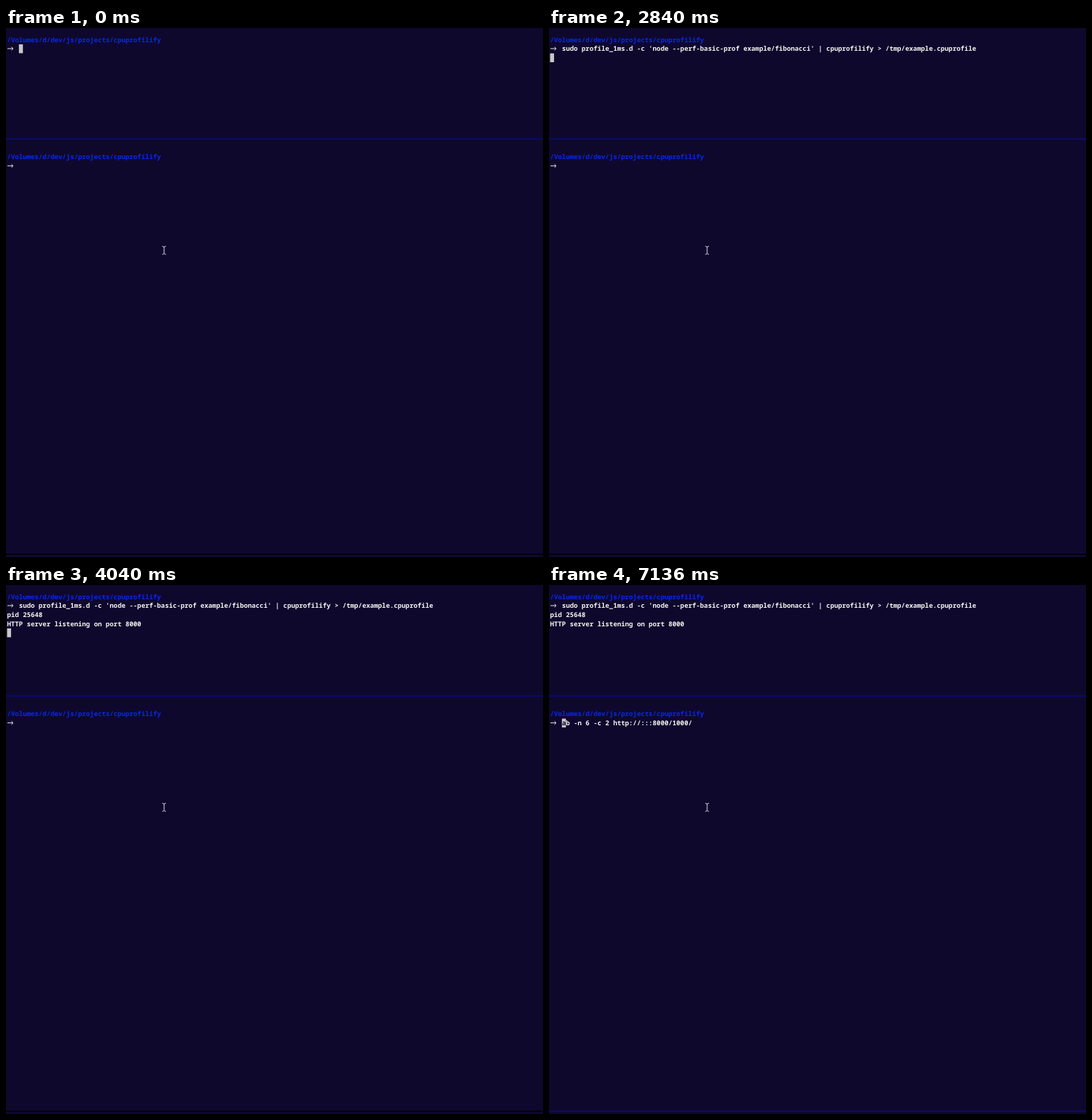
An HTML page for the animation above (8000 ms loop, 754 by 743 pixels).

```html
<!DOCTYPE html>
<html lang="en">
<head>
<meta charset="utf-8">
<title>Terminal profiling session</title>
<style>
html, body { margin: 0; width: 100%; height: 100%; overflow: hidden; background: #0f082d; }
svg { display: block; width: 100%; height: 100%; }
text { font: 600 9.24px "Noto Sans Mono", "DejaVu Sans Mono", monospace; fill: #f4f4f0; text-rendering: geometricPrecision; }
.path { fill: #0528f0; }
.under { fill: #0f082d; }
.arrow { fill: none; stroke: #e8e8e4; }
</style>
</head>
<body>
<svg id="stage" viewBox="0 0 754 743">
  <rect width="754" height="743" fill="#0f082d"/>
  <rect y="155" width="754" height="2" fill="#080d66"/>
  <rect id="footer" y="738" width="754" height="2"/>
  <g id="lines"></g>
  <rect id="cursor" width="5.6" height="12.4" fill="#c8c8c8"/>
  <text id="covered" class="under"></text>
  <path d="M219.5 306.5q2 0 2.5 1.5q.5-1.5 2.5-1.5M222 308v8.5M219.5 318q2 0 2.5-1.5q.5 1.5 2.5 1.5" fill="none" stroke="#e0e0e0"/>
</svg>
<script>
const LOOP = 8000, CELL = 5.544, LEFT = 1.5, ROW = 12.67, TOP = 10.3;
const PASTE = 1050, RUN = 2840, LISTEN = 3140, SWITCH = 4640, REQUEST = 5840;
const DIRECTORY = '/Volumes/d/dev/js/projects/cpuprofilify';
const PROFILE = "sudo profile_1ms.d -c 'node --perf-basic-prof example/fibonacci' | cpuprofilify > /tmp/example.cpuprofile";
const BENCH = 'ab -n 6 -c 2 http://:::8000/1000/';

const $ = id => document.getElementById(id);
const columnX = column => LEFT + column * CELL;
const rowY = row => TOP + row * ROW;
const baseline = row => rowY(row) + 9.3;

function add(tag, attributes, content = '') {
  const node = document.createElementNS('http://www.w3.org/2000/svg', tag);
  for (const [name, value] of Object.entries(attributes)) node.setAttribute(name, value);
  node.textContent = content;
  $('lines').append(node);
  return node;
}

const line = (row, column, content, start = 0, style = '') => ({
  start,
  node: add('text', { x: columnX(column), y: baseline(row), class: style }, content)
});

function prompt(row) {
  const y = rowY(row + 1) + 6;
  add('path', { class: 'arrow', d: `M2 ${y}h8M7.7 ${y - 2.3}l2.3 2.3l-2.3 2.3` });
  return line(row, 0, DIRECTORY, 0, 'path');
}

const lines = [
  prompt(0),
  line(1, 3, PROFILE, PASTE),
  line(2, 0, 'pid 25648', LISTEN),
  line(3, 0, 'HTTP server listening on port 8000', LISTEN),
  prompt(13),
  line(14, 3, BENCH, REQUEST)
];

// Cursor position and the character beneath it from each time on.
const cursorStops = [
  { start: 0, row: 1, column: 3, char: '' },
  { start: PASTE, row: 1, column: 3, char: 's' },
  { start: RUN, row: 2, column: 0, char: '' },
  { start: LISTEN, row: 4, column: 0, char: '' },
  { start: SWITCH, row: 14, column: 3, char: '' },
  { start: REQUEST, row: 14, column: 3, char: 'a' }
];

function draw(time) {
  for (const { start, node } of lines) node.style.display = time >= start ? '' : 'none';

  const { row, column, char } = cursorStops.findLast(stop => time >= stop.start);
  $('cursor').setAttribute('x', columnX(column));
  $('cursor').setAttribute('y', rowY(row));
  $('covered').setAttribute('x', columnX(column));
  $('covered').setAttribute('y', baseline(row));
  $('covered').textContent = char;
  $('footer').setAttribute('fill', time >= SWITCH ? '#080d66' : '#03020c');
}

function tick() {
  draw(performance.now() % LOOP);
  requestAnimationFrame(tick);
}
tick();
</script>
</body>
</html>
```
